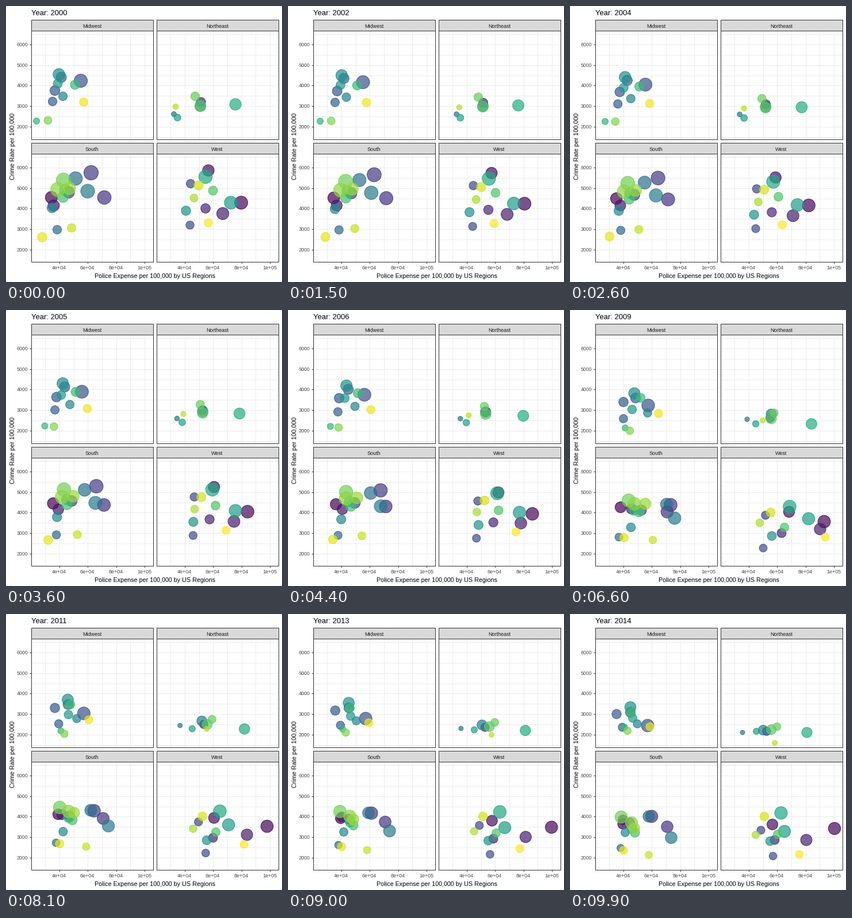
Recreate the animation shown at these times as a matplotlib script. Size 480 px wide and 480 px high, loop 10 s.

```python
import numpy as np
import matplotlib.pyplot as plt
from matplotlib.animation import FuncAnimation
from matplotlib.patches import Circle, Rectangle

SIZE, DPI = 480, 80
FRAMES, INTERVAL = 100, 100
FIRST, PEAK, LAST = 2000, 2009.33, 2014
EASE = 1.8
PT = 72 / DPI  # points per pixel
GRID, DARK, STRIP = "#EBEBEB", "#333333", "#D9D9D9"

plt.rcParams["font.family"] = "Liberation Sans"
fig = plt.figure(figsize=(SIZE / DPI, SIZE / DPI), dpi=DPI, facecolor="white")
ax = fig.add_axes([0, 0, 1, 1])
ax.set_xlim(0.5, SIZE + 0.5)
ax.set_ylim(SIZE + 0.5, 0.5)
ax.axis("off")


def line(x, y, color, z):
    ax.plot(x, y, color=color, lw=PT, zorder=z, solid_capstyle="butt")


def label(x, y, text, px, color="black", **kw):
    kw = {"ha": "center", "va": "baseline", **kw}
    return ax.text(x, y, text, fontsize=px * PT, color=color, zorder=6, **kw)


def box(x, y, w, h, fill, z):
    ax.add_patch(Rectangle((x, y), w, h, fc=fill, ec=DARK, lw=PT,
                           joinstyle="miter", zorder=z))


def panel(name, left, top, first_col, last_row):
    right, head = left + 212, top + 19
    bottom = 445 if last_row else 232
    for i in range(8):
        x = round(left + 24.4 + 24.62 * i)
        line((x, x), (head, bottom), GRID, 1)
        if i % 2 and last_row:
            line((x, x), (bottom, bottom + 3), DARK, 5)
            label(x, 458.5, f"{(3 + i) * 10000:.0e}", 9, "#4D4D4D")
    for i in range(11):
        y = round(head + 6 + 17.9 * i)
        line((left, right), (y, y), GRID, 1)
        if i % 2 and first_col:
            line((left - 3, left), (y, y), DARK, 5)
            label(left - 5, y + 3.5, str(6500 - 500 * i), 8.8,
                  "#4D4D4D", ha="right")
    box(left, head, right - left, bottom - head, "none", 5)
    box(left, top, right - left, head - top, STRIP, 4)
    label((left + right) / 2, top + 15, name, 9, "#1A1A1A")


class Bubble:
    """Moves from start through a spending peak to its end, changing size."""

    def __init__(self, radius, growth, start, peak, end):
        self.radii = radius - 0.5, radius * growth - 0.5
        self.start, self.peak, self.end = start, peak, end
        self.dot = ax.add_patch(Circle(start, radius, lw=1.1 * PT, zorder=3))

    def paint(self, rgb):
        self.dot.set(facecolor=(*rgb, 0.7), edgecolor=(*rgb, 0.85))

    def move(self, year):
        if year < PEAK:
            (x0, y0), (x1, y1) = self.start, self.peak
            u = (year - FIRST) / (PEAK - FIRST)
            ux = u ** EASE
        else:
            (x0, y0), (x1, y1) = self.peak, self.end
            u = (year - PEAK) / (LAST - PEAK)
            ux = 1 - (1 - u) ** EASE
        self.dot.center = (x0 + (x1 - x0) * ux + 0.5,
                           y0 + (y1 - y0) * u ** EASE + 0.5)
        self.dot.radius = np.interp(year, (FIRST, LAST), self.radii)


bubbles = {}


def region(growth, **states):
    for state, (radius, *points) in states.items():
        bubbles[state] = Bubble(radius, growth, *points)


panel("Midwest", 44, 24, True, False)
panel("Northeast", 262, 24, False, False)
panel("South", 44, 238, True, True)
panel("West", 262, 238, False, True)
label(259.5, 473.5, "Police Expense per 100,000 by US Regions", 10.75)
label(18, 244.5, "Crime Rate per 100,000", 10.9, rotation=90, va="center", ha="right")
title = label(44.5, 17, "", 13, ha="left")

# Each state: radius, then its place at the first year, the peak and the last year
region(  # Midwest
    0.95,
    Illinois=(12, (130, 130), (136, 166), (135, 194)),
    Indiana=(9, (85, 147), (93, 160), (81, 174)),
    Iowa=(8, (81, 166), (93, 189), (91, 197)),
    Kansas=(9.5, (96, 124), (114, 153), (105, 171)),
    Minnesota=(8, (99, 157), (135, 179), (117, 191)),
    Missouri=(10.7, (92, 119), (112, 145), (105, 162)),
    Nebraska=(8.3, (90, 135), (108, 173), (109, 181)),
    North_Dakota=(6, (53, 200), (96, 205), (95, 197)),
    Ohio=(8.5, (120, 137), (123, 153), (106, 171)),
    South_Dakota=(7.3, (73, 199), (104, 210), (100, 203)),
    Wisconsin=(7.8, (135, 167), (154, 180), (139, 196)),
)
region(  # Northeast
    0.9,
    Connecticut=(8.5, (339, 167), (348, 188), (342, 204)),
    Maine=(4.8, (292, 188), (308, 190), (300, 206)),
    Massachusetts=(10, (338, 174), (350, 181), (336, 202)),
    New_Hampshire=(6.5, (298, 194), (323, 198), (324, 204)),
    New_York=(10.5, (399, 171), (420, 198), (412, 206)),
    Pennsylvania=(10, (338, 174), (350, 189), (350, 201)),
    Rhode_Island=(8, (329, 157), (355, 179), (360, 196)),
    Vermont=(5.2, (295, 175), (335, 192), (356, 224)),
)
region(  # South
    0.86,
    Alabama=(11, (79, 333), (88, 343), (92, 365)),
    Arkansas=(10.3, (83, 347), (107, 346), (92, 358)),
    Delaware=(12.3, (171, 333), (169, 351), (169, 370)),
    Florida=(13, (148, 290), (175, 339), (142, 352)),
    Georgia=(10.5, (109, 324), (124, 348), (104, 363)),
    Kentucky=(8, (89, 389), (85, 395), (88, 407)),
    Louisiana=(12.2, (121, 300), (168, 338), (137, 352)),
    Maryland=(12.5, (142, 322), (182, 362), (176, 389)),
    Mississippi=(9, (80, 351), (106, 378), (96, 380)),
    North_Carolina=(10.3, (103, 320), (111, 348), (108, 373)),
    Oklahoma=(10, (99, 332), (120, 351), (113, 380)),
    South_Carolina=(13, (100, 303), (102, 331), (89, 353)),
    Tennessee=(12.8, (90, 319), (112, 337), (107, 363)),
    Texas=(11.3, (110, 317), (131, 337), (112, 373)),
    Virginia=(7.8, (114, 386), (144, 400), (137, 419)),
    West_Virginia=(8.6, (63, 402), (94, 396), (93, 411)),
)
region(  # West
    0.94,
    Alaska=(11.8, (409, 342), (442, 368), (460, 373)),
    Arizona=(10.5, (352, 286), (381, 351), (352, 366)),
    California=(11, (377, 361), (435, 381), (411, 393)),
    Colorado=(8.7, (347, 352), (368, 388), (356, 393)),
    Hawaii=(7.9, (321, 309), (340, 357), (332, 376)),
    Idaho=(7.6, (320, 381), (336, 414), (353, 421)),
    Montana=(8.6, (313, 356), (351, 393), (348, 395)),
    Nevada=(11.7, (391, 342), (415, 363), (373, 378)),
    New_Mexico=(12.2, (347, 297), (382, 342), (367, 346)),
    Oregon=(8.3, (360, 321), (373, 378), (361, 383)),
    Utah=(7.4, (327, 334), (330, 370), (323, 384)),
    Washington=(8.5, (335, 312), (349, 352), (338, 352)),
    Wyoming=(7.7, (352, 377), (444, 395), (399, 418)),
)

# Colours follow the alphabet
for state, rgba in zip(sorted(bubbles), plt.cm.viridis(np.linspace(0, 1, len(bubbles)))):
    bubbles[state].paint(rgba[:3])


def update(frame):
    year = FIRST + (LAST - FIRST) * frame / (FRAMES - 1)
    title.set_text(f"Year: {round(year)}")
    for bubble in bubbles.values():
        bubble.move(year)
    return [title] + [b.dot for b in bubbles.values()]


anim = FuncAnimation(fig, update, frames=FRAMES, interval=INTERVAL,
                     repeat=True, repeat_delay=0, blit=False)
plt.show()
```
